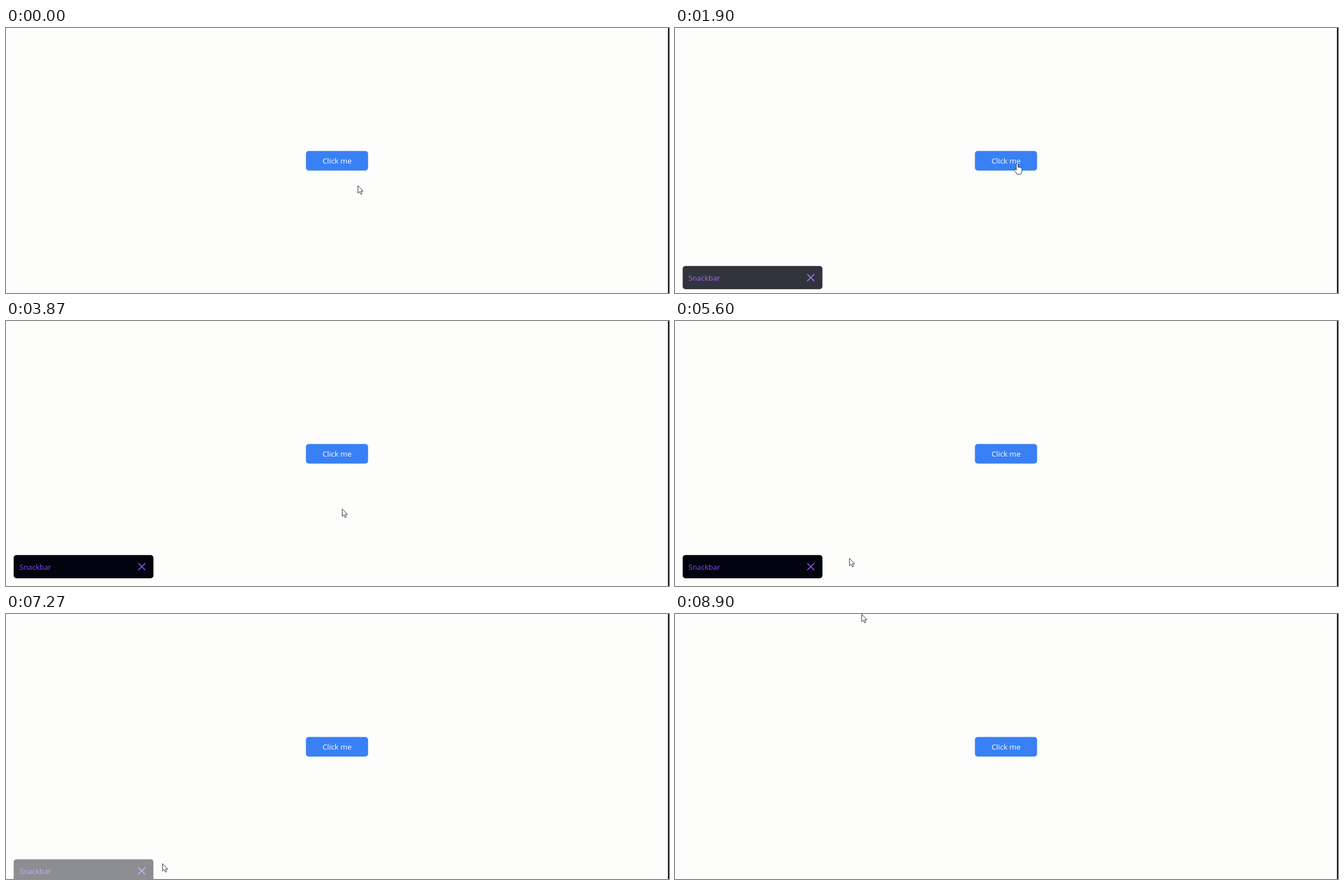
An HTML page that plays this animation: 1184x473 px, repeating every 8970 ms.

```html
<!DOCTYPE html>
<html lang="en">
<head>
<meta charset="utf-8">
<title>Snackbar demo</title>
<style>
  html, body { margin: 0; width: 100%; height: 100%; overflow: hidden; background: #fdfdfc; }
  svg { display: block; width: 1184px; height: 473px; }
  text { font-family: "Open Sans", "Noto Sans", sans-serif; }
  .pointer path { fill: #fff; stroke: #262632; stroke-width: .95; stroke-linejoin: round; }
</style>
</head>
<body>
<svg viewBox="0 0 1184 473">
  <rect width="1184" height="473" fill="#fdfdfc"/>
  <rect x="1182.2" width="1.8" height="473" fill="#000"/>

  <rect x="535.6" y="219.6" width="111" height="34.8" rx="5" fill="#3980f5"/>
  <text x="591.2" y="242" font-size="13.4" text-anchor="middle" fill="#fff">Click me</text>

  <g id="snack" opacity="0">
    <rect x="13.7" y="417.7" width="249.6" height="41.6" rx="5" fill="#01040f"/>
    <text x="24" y="444" font-size="13.2" fill="#854df3">Snackbar</text>
    <path d="M236.8 432.8l11.4 11.4m0-11.4l-11.4 11.4" stroke="#854df3" stroke-width="1.9" stroke-linecap="round"/>
  </g>

  <g id="pointer" class="pointer">
    <path id="arrow" d="M.5 .5V13.8L3.5 11L5.6 15.8L7.8 14.9L5.8 10.2H9.8Z"/>
    <path id="hand" d="M-1.5 1.6Q0 -.6 1.5 1.6V7.4Q3 6.3 4 8Q5.6 6.9 6.5 8.6Q8.5 8 8.5 10.5V14Q8.5 17 6.5 20H-.5Q-1.5 17 -4.5 13.5Q-5.5 11.5 -4 11Q-2.8 10.7 -1.5 12.5Z"/>
  </g>
</svg>
<script>
  const LOOP = 8970, FPS = 30, RISE = 36, FADE = 600;
  const OPEN = 1600, CLOSE = 7073;
  const byId = id => document.getElementById(id);
  const snack = byId('snack'), pointer = byId('pointer');
  const arrow = byId('arrow'), hand = byId('hand');

  // each move runs from the last resting place to "to", bent by two handles if given
  const home = [628, 281];
  const moves = [
    { from: 0, until: 570, bend: [[650, 175], [450, 240]], to: [601, 281] },
    { from: 880, until: 1130, to: [604, 241] },
    { from: 1300, until: 1330, to: [611, 241] },
    { from: 3050, until: 3570, to: [606, 335] },
    { from: 3780, until: 3870, to: [600, 335] },
    { from: 4850, until: 5970, to: [255, 440] },
    { from: 6110, until: 6400, to: [249, 441] },
    { from: 7110, until: 7930, bend: [[350, 455], [502, 477]], to: [540, 406] },
    { from: 7930, until: 8830, bend: [[630, 300], [480, 120]], to: [333, 0] }
  ];

  const clamp = x => Math.min(1, Math.max(0, x));
  const smooth = x => x * x * (3 - 2 * x);
  const cubic = (s, a, b, c, d) =>
    (1 - s) ** 3 * a + 3 * (1 - s) ** 2 * s * b + 3 * (1 - s) * s * s * c + s ** 3 * d;

  function pointerAt(t) {
    let at = home;
    for (const { from, until, bend, to } of moves) {
      if (t < from) break;
      const s = smooth(clamp((t - from) / (until - from)));
      const [p, q] = bend || [at, to];
      at = at.map((a, k) => cubic(s, a, p[k], q[k], to[k]));
    }
    return at.map(Math.round);
  }

  // the CSS "ease" curve
  function ease(x) {
    let lo = 0, hi = 1;
    for (let n = 0; n < 24; n++) {
      const mid = (lo + hi) / 2;
      if (cubic(mid, 0, .25, .25, 1) < clamp(x)) lo = mid; else hi = mid;
    }
    return cubic(hi, 0, .1, 1, 1);
  }

  const inside = (x, y, l, t, r, b) => x >= l && x <= r && y >= t && y <= b;

  function draw(now) {
    const frame = Math.floor((now % LOOP + 4) * FPS / 1000);
    const t = frame * 1000 / FPS;

    const shown = clamp(ease((t - OPEN) / FADE) - ease((t - CLOSE) / FADE));
    snack.setAttribute('opacity', shown.toFixed(3));
    snack.setAttribute('transform', `translate(0 ${Math.round(RISE * (1 - shown))})`);

    const [x, y] = pointerAt(t);
    const linked = inside(x, y, 536, 220, 646, 254) ||
      shown > 0 && inside(x, y, 234, 430, 252, 448);
    pointer.setAttribute('transform', `translate(${x} ${y})`);
    arrow.style.display = linked ? 'none' : '';
    hand.style.display = linked ? '' : 'none';
  }

  const start = performance.now();
  function tick() {
    draw(performance.now() - start);
    requestAnimationFrame(tick);
  }
  tick();
</script>
</body>
</html>
```
